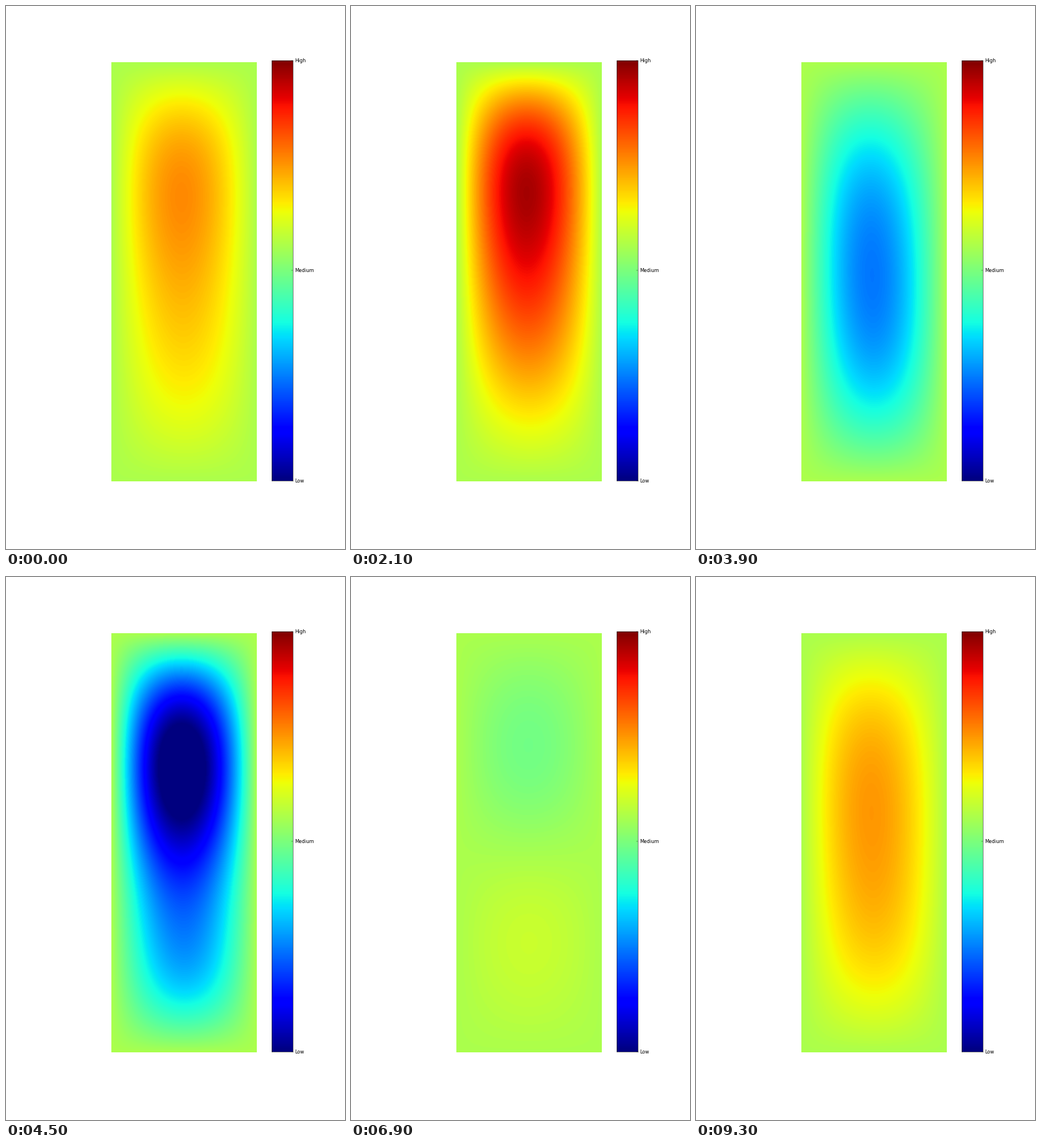
Recreate the animation shown at these times as a matplotlib script. Size 592 by 947 pixels, loop 9600 ms.

```python
import numpy as np
import matplotlib.pyplot as plt
from matplotlib.animation import FuncAnimation

W, H, DPI = 592, 947, 50
FRAMES, STEP = 32, 300
NX, NY = 254, 731
REST = 0.557

plt.rcParams.update({
    "font.family": "DejaVu Sans",
    "font.size": 12,
    "ytick.alignment": "center",
})


def harmonics(t):
    """Periodic basis, weighted so that the smoothest curve wins."""
    k = np.arange(1, 11)
    phase = 2 * np.pi * np.outer(t, k) / FRAMES
    ones = np.full((len(phase), 1), 5.0)
    return np.hstack([ones, np.cos(phase) / k**2, np.sin(phase) / k**2])


def loop_curve(values):
    """Smooth closed curve through the key moments, one value per frame."""
    keys = [0, 7, 11, 15, 19, 23, 31]
    return harmonics(np.arange(FRAMES)) @ np.linalg.pinv(harmonics(keys)) @ values


# The whole plate swells while the weight shifts between top and bottom
swell = loop_curve([0.195, 0.370, 0.008, -0.561, -0.380, -0.018, 0.200])
shift = loop_curve([0.045, 0.111, 0.158, -0.151, -0.097, -0.053, 0.014])

x = np.pi * (np.arange(NX) + 0.5) / NX
y = np.pi * (np.arange(NY) + 0.5) / NY


def field(i):
    a, b = swell[i], shift[i]
    c = 0.45 * b - 0.02 * np.sin(2 * np.pi * i / FRAMES)
    down = (a * np.sin(y) + b * np.sin(2 * y)
            + c * np.sin(3 * y) + 0.9 * b**2 * np.sin(4 * y))
    lean = 0.02 * a * (np.sin(y) + 0.7 * np.sin(2 * y))
    return REST + np.outer(down, np.sin(x)) + np.outer(lean, np.sin(2 * x))


def box(x0, y0, x1, y1):
    """Axes rectangle from pixel corners measured from the top left."""
    return [x0 / W, 1 - y1 / H, (x1 - x0) / W, (y1 - y0) / H]


fig = plt.figure(figsize=(W / DPI, H / DPI), dpi=DPI, facecolor="white")
style = dict(cmap="jet", vmin=0, vmax=1, interpolation="nearest", aspect="auto")

ax = fig.add_axes(box(184, 98, 184 + NX, 98 + NY))
ax.axis("off")
plate = ax.imshow(field(0), **style)

bar = fig.add_axes(box(464, 95, 501, 828))
bar.imshow(np.linspace(0, 1, 256)[:, None], origin="lower",
           extent=(0, 1, 0, 1), **style)
bar.set_xticks([])
bar.yaxis.tick_right()
bar.set_yticks([0, 0.5, 1], ["Low", "Medium", "High"])
bar.tick_params(axis="y", direction="in", length=4, width=0.5, pad=4)


def update(i):
    plate.set_data(field(i))
    return [plate]


anim = FuncAnimation(fig, update, frames=FRAMES, interval=STEP,
                     repeat=True, repeat_delay=0, blit=False)
plt.show()
```
